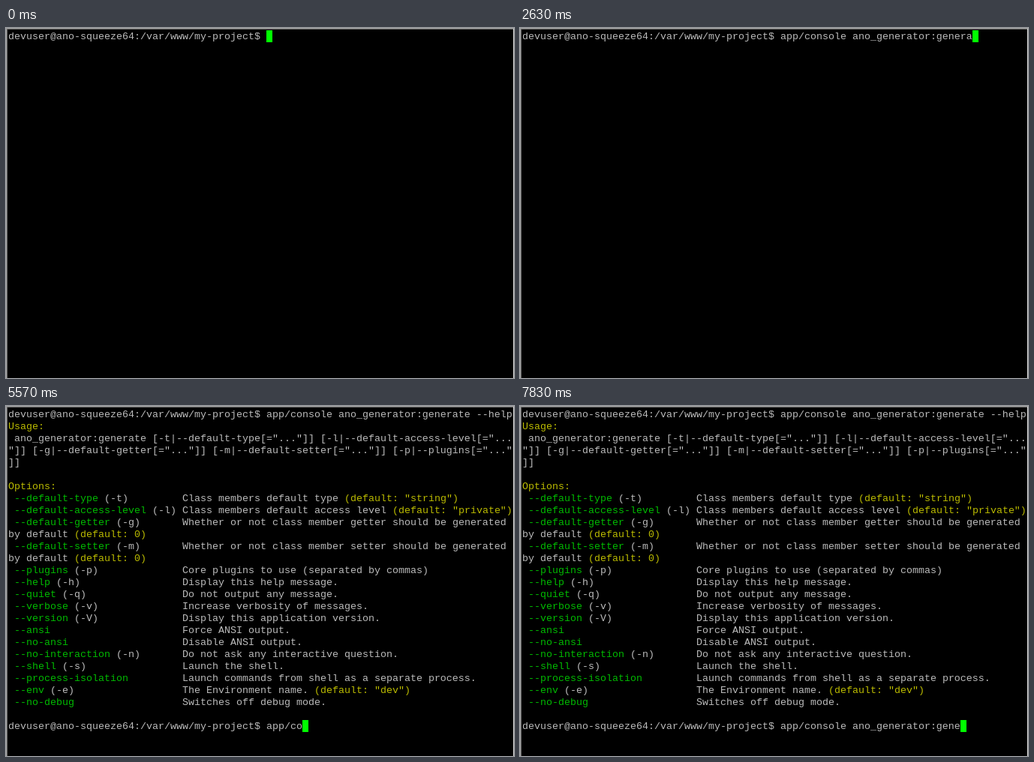
Recreate the animation shown at these times as an HTML page. Size 677 by 467 pixels, loop 8 s.

```html
<!DOCTYPE html>
<html lang="en">
<head>
<meta charset="utf-8">
<title>Terminal</title>
<style>
html, body { margin: 0; width: 100%; height: 100%; overflow: hidden; background: #000; }
#frame {
  position: absolute; inset: 0;
  box-shadow: inset 1px 1px #a0a0a0, inset -1px 0 #e3e3e3, inset 2px 2px #696969;
}
pre {
  position: absolute; left: 3px; top: 4px; margin: 0; color: #bbb;
  font: 13.3333px/16px "Liberation Mono", monospace;
}
.green { color: #0b0; }
.yellow { color: #bb0; }
#cursor { position: absolute; width: 8px; height: 16px; background: #0f0; }
</style>
</head>
<body>
<div id="frame"></div>
<pre id="screen"></pre>
<div id="cursor"></div>
<script>
const LOOP = 8000, COLUMNS = 84;
const PROMPT = 'devuser@ano-squeeze64:/var/www/my-project$ ';
const HELP = `
Usage:
 ano_generator:generate [-t|--default-type[="..."]] [-l|--default-access-level[="...
"]] [-g|--default-getter[="..."]] [-m|--default-setter[="..."]] [-p|--plugins[="..."
]]

Options:
 --default-type (-t)         Class members default type (default: "string")
 --default-access-level (-l) Class members default access level (default: "private")
 --default-getter (-g)       Whether or not class member getter should be generated
by default (default: 0)
 --default-setter (-m)       Whether or not class member setter should be generated
by default (default: 0)
 --plugins (-p)              Core plugins to use (separated by commas)
 --help (-h)                 Display this help message.
 --quiet (-q)                Do not output any message.
 --verbose (-v)              Increase verbosity of messages.
 --version (-V)              Display this application version.
 --ansi                      Force ANSI output.
 --no-ansi                   Disable ANSI output.
 --no-interaction (-n)       Do not ask any interactive question.
 --shell (-s)                Launch the shell.
 --process-isolation         Launch commands from shell as a separate process.
 --env (-e)                  The Environment name. (default: "dev")
 --no-debug                  Switches off debug mode.

`;
const HELP_HTML = HELP
  .replace(/^ --[\w-]+/gm, '<span class=green>$&</span>')
  .replace(/\(default: .*?\)|^(Usage|Options):$/gm, '<span class=yellow>$&</span>');

// Typing bursts: first key time, last key time, keys, screen updates (default: one per key)
const BURSTS = [
  [470, 630, 'app'],
  [770, 1470, '/console ano'],
  [1630, 2230, '_generator:', 9],
  [2370, 2630, 'genera', 5],
  [2730, 2800, 'te ', 2],
  [3130, 3230, '--'],
  [3370, 3370, 'h'],
  [3570, 3730, 'elp'],
  [4170, 4170, '\n'],
  [4500, 4670, 'app'],
  [4830, 4830, ':'],
  [4970, 4970, 'c'],
  [5130, 5130, '\b'],
  [5300, 5570, '\b/co'],
  [5630, 5830, 'nsol'],
  [5970, 6000, 'e '],
  [6170, 6330, 'ano'],
  [6500, 6730, '_gne'],
  [6900, 7330, '\b\benerat', 7],
  [7470, 7830, 'or:gene'],
];
const keys = BURSTS.flatMap(([start, end, text, steps = text.length]) =>
  [...text].map((key, i) => {
    const step = Math.floor(i * steps / text.length);
    return { key, time: start + (end - start) * step / Math.max(1, steps - 1) };
  }));

const screenEl = document.getElementById('screen');
const cursorEl = document.getElementById('cursor');
let shown;

function render(time) {
  let typed = '';
  for (const { key, time: at } of keys) {
    if (at > time + 0.5) break;
    typed = key === '\b' ? typed.slice(0, -1) : typed + key;
  }
  if (typed === shown) return;
  shown = typed;

  const lines = typed.split('\n').map(command => PROMPT + command);
  screenEl.innerHTML = lines.join(HELP_HTML);
  const column = lines.at(-1).length;
  const row = (lines.length > 1 ? HELP.split('\n').length - 1 : 0) + Math.floor(column / COLUMNS);
  cursorEl.style.left = 3 + column % COLUMNS * 8 + 'px';
  cursorEl.style.top = 3 + row * 16 + 'px';
}

const origin = performance.now();
function tick() {
  render((performance.now() - origin) % LOOP);
  requestAnimationFrame(tick);
}
tick();
</script>
</body>
</html>
```
